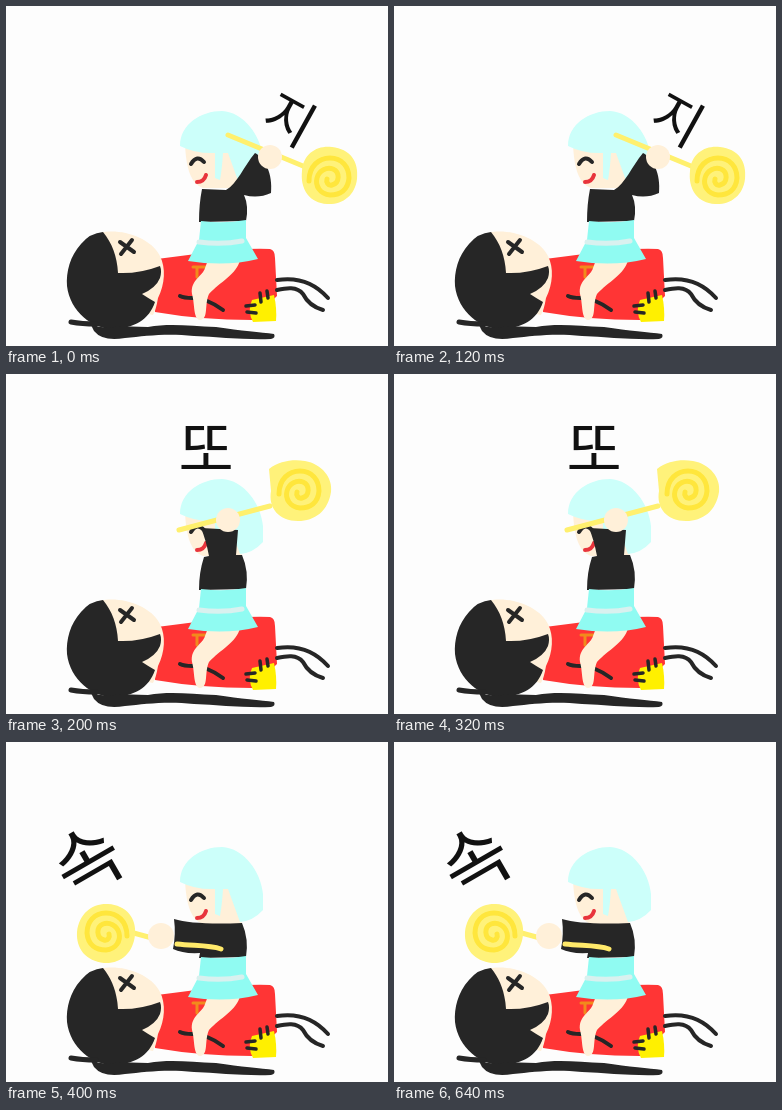
Animation of 382x340 px, one loop 800 ms. Source, as an HTML page:

```html
<!DOCTYPE html>
<html lang="ko">
<head>
<meta charset="utf-8">
<title>Lollipop</title>
<style>
html, body { margin: 0; width: 100%; height: 100%; overflow: hidden; background: #fdfdfd; }
svg { display: block; width: 382px; height: 340px; }
text { font: 300 60px "Noto Sans CJK KR", "Noto Sans CJK", sans-serif; text-anchor: middle; fill: #111; }
.line { fill: none; stroke-linecap: round; stroke-linejoin: round; }
.ink { fill: #262626; }
.line.ink { fill: none; stroke: #262626; stroke-width: 4; }
.skin { fill: #fff0d9; }
.hair { fill: #ccfffa; }
.stick { stroke: #fff06e; stroke-width: 5; }
.candy { fill: #fff27a; }
.swirl { stroke: #ffe63c; stroke-width: 5; }
.pose { visibility: hidden; animation: .8s step-end infinite; }
.raise { animation-name: raise; }
.swing { animation-name: swing; }
.hit { animation-name: hit; }
@keyframes raise { 0% { visibility: visible; } 25%, 100% { visibility: hidden; } }
@keyframes swing { 0% { visibility: hidden; } 25% { visibility: visible; } 50%, 100% { visibility: hidden; } }
@keyframes hit { 0% { visibility: hidden; } 50%, 100% { visibility: visible; } }
</style>
</head>
<body>
<svg viewBox="0 0 382 340">
  <defs>
    <path id="swirl" class="line swirl" d="M-20 4C-20-11-10-19 1-19C13-19 20-10 20 1C19 13 11 18 1 18C-9 17-14 9-12 1C-10-7-2-10 4-8C11-5 11 6 3 8C-1 9-3 5-2 2"/>
  </defs>

  <!-- lying figure -->
  <path fill="#ff3535" d="M151 253L190 248Q230 242 264 243Q269 244 269 252L271 290L246 314Q195 314 149 306Z"/>
  <path fill="#fff000" d="M246 294L268 289Q271 302 270 315L247 316Q241 305 246 294Z"/>
  <path class="line ink" d="M271 274C290 271 308 276 322 292M271 284C280 282 291 280 297 288C302 298 310 302 317 304"/>
  <path class="line ink" d="M174 290C182 294 190 290 199 294Q209 298 217 304"/>
  <path class="line ink" style="stroke-width:3.5" d="M254 287L255 296M261 285L262 292M240 300L249 299M241 306L250 307"/>
  <path class="skin" d="M94 227C112 222 144 230 154 250C160 262 159 278 152 292Q150 304 147 309L105 300Z"/>
  <path class="ink" d="M97 226Q84 227 75 238C64 250 60 266 61 280C64 306 87 323 107 323C128 322 143 314 149 296Q142 292 136 288Q150 282 154 272Q156 265 154 260Q133 268 112 267C111 250 106 237 97 226Z"/>
  <path class="line ink" d="M114 236L128 246M126 234L115 248"/>
  <path class="line ink" style="stroke-width:5" d="M65 316Q76 318 90 318"/>
  <path class="ink" d="M84 317Q94 323 108 321Q124 320 142 321C164 317 184 320 210 321C235 325 255 326 268 328Q270 332 265 333C238 334 212 331 188 330C160 327 140 330 119 332Q97 336 88 325Z"/>

  <!-- seated figure, legs -->
  <path class="line" stroke="#f28a1c" stroke-width="3" d="M187 261H200M191 262V271"/>
  <path class="skin" d="M202 254H234C231 268 214 276 203 288C198 299 203 313 194 314C187 313 189 298 186 288C184 274 197 270 199 262Z"/>

  <!-- head seen from the side -->
  <path class="skin" d="M179 138L224 138L236 182H197C184 178 180 160 179 138Z"/>
  <path class="hair" d="M174 140C174 118 195 105 216 105C238 106 255 130 257 152V168Q247 179 234 180L222 147H217Q216 163 214 174L209 172V147Q190 148 174 140Z"/>
  <path class="line ink" d="M185 158Q191 148 198 156"/>
  <path class="line" stroke="#e8343c" stroke-width="4" d="M191 176Q198 176 200 169"/>

  <g class="pose raise">
    <path class="ink" d="M196 183L220 184C231 178 238 160 249 147C259 152 267 168 265 187Q252 193 238 189Q243 200 240 215L193 216Q193 198 196 183Z"/>
    <path class="line stick" d="M222 129L297 160"/>
    <circle class="skin" cx="264" cy="151" r="12"/>
    <path class="candy" d="M296 165C297 147 312 139 326 141C344 143 353 155 351 173C349 190 336 199 321 198C304 197 294 184 296 165Z"/>
    <use href="#swirl" x="323" y="171"/>
    <text transform="translate(284 113) rotate(29)" y="20" style="font-size:53px">지</text>
  </g>

  <g class="pose swing">
    <path class="ink" d="M195 154L232 156L230 181H236Q243 197 240 215L193 216Q193 198 198 183L203 182Q200 166 195 154Z"/>
    <path class="line stick" d="M173 156L264 132"/>
    <circle class="skin" cx="222" cy="146" r="12"/>
    <path class="candy" d="M263 95C273 87 287 85 299 87C316 90 327 104 325 118C322 137 309 147 292 147C273 147 262 134 265 117Z"/>
    <use href="#swirl" x="293" y="116"/>
    <text x="200" y="97">또</text>
  </g>

  <g class="pose hit">
    <path class="line stick" d="M124 190L146 196"/>
    <path class="ink" d="M168 177Q188 183 236 181Q243 197 240 215L193 216L194 211Q177 212 167 207Q170 192 168 177Z"/>
    <circle class="skin" cx="155" cy="194" r="13"/>
    <path class="line" stroke="#ffe96a" stroke-width="5" d="M171 202C188 204 203 203 215 207"/>
    <path class="candy" d="M71 190C73 171 87 161 102 162C120 163 131 176 129 193C127 211 115 222 98 221C80 219 70 207 71 190Z"/>
    <use href="#swirl" transform="translate(101 190) scale(-1 1)"/>
    <text transform="translate(81 118) rotate(-30)" y="27" style="font-size:72px">속</text>
  </g>

  <!-- skirt -->
  <path fill="#90fbf2" d="M195 215Q218 218 240 214L240 232L252 253Q220 261 182 255L193 234Z"/>
  <path class="line" stroke="#d9f1ef" stroke-width="5" d="M193 236Q216 239 236 235"/>
</svg>
</body>
</html>
```
